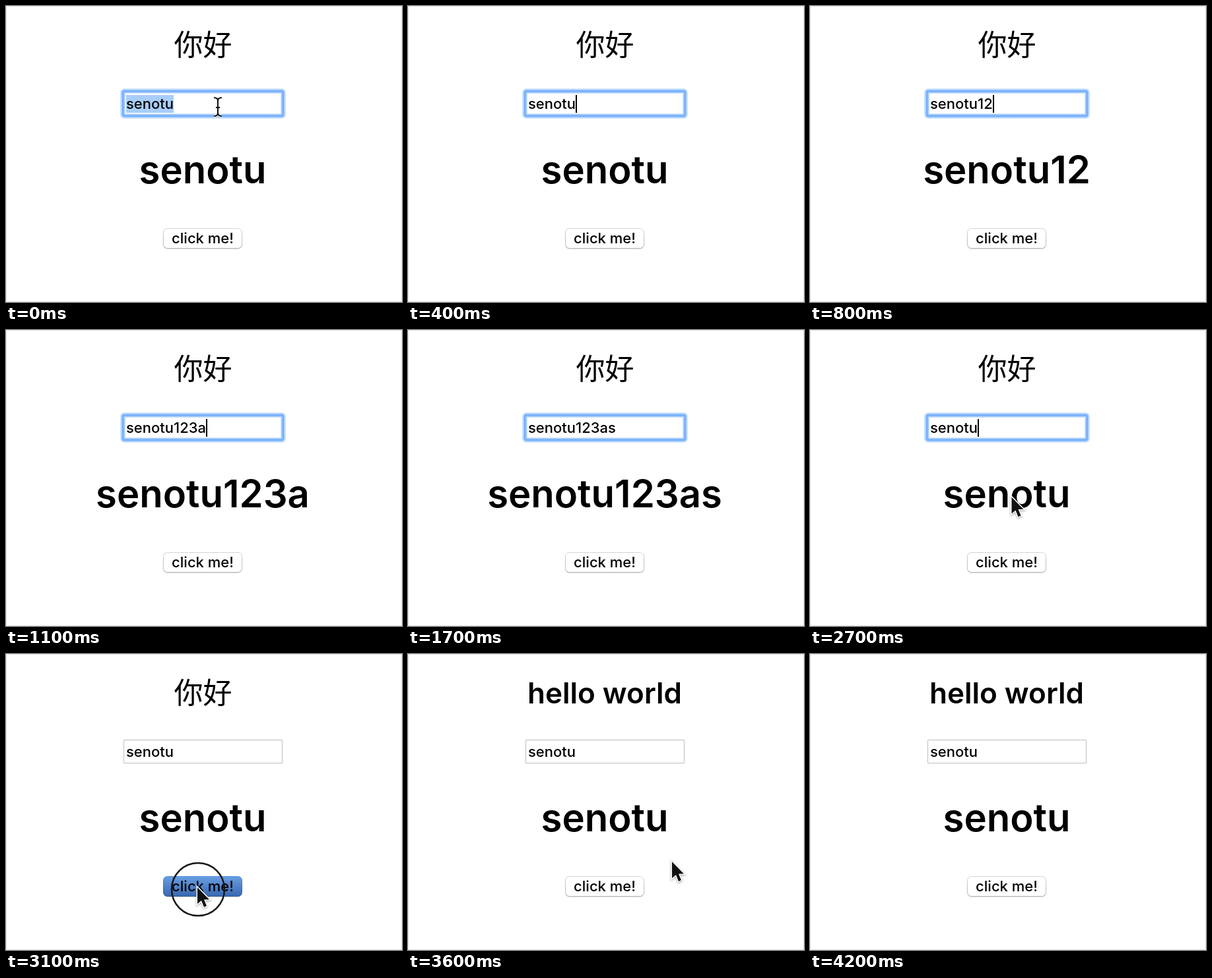
An HTML page with a canvas for the animation above (4.3 s loop, 600 px wide and 449 px high).

```html
<!DOCTYPE html>
<html lang="zh-CN">
<head>
<meta charset="utf-8">
<style>
  html, body { margin: 0; width: 600px; height: 449px; overflow: hidden; background: #fff; }
  canvas { display: block; }
</style>
</head>
<body>
<canvas id="stage" width="600" height="449"></canvas>
<script>
const ctx = document.getElementById('stage').getContext('2d');
const LOOP = 4300, STEP = 100, CENTER = 298;
const FONT = 'Inter, "Noto Sans CJK SC", "Noto Sans CJK", sans-serif';
const SMALL = '450 22px';
const NAME = 'senotu';

// [start time, text after the name]
const typing = [
  [0, ''], [500, '1'], [600, '12'], [900, '123'], [1100, '123a'], [1200, '123as'],
  [1400, '123asd'], [1600, '123as'], [1900, '123a'], [2000, '123'], [2100, '12'],
  [2200, '1'], [2300, '']
];
// [time, x, y] of the pointer tip
const moves = [
  [2500, 321, 153], [2900, 290, 354], [3300, 290, 354], [3600, 400, 315], [4000, 512, 270]
];

const within = (t, from, to) => t >= from && t < to;

function text(str, x, y, font, align = 'center') {
  ctx.font = `${font} ${FONT}`;
  ctx.textAlign = align;
  ctx.fillStyle = '#000';
  ctx.fillText(str, x, y);
}

function box(x, y, w, h, r, fill, stroke, line = 1) {
  ctx.beginPath();
  ctx.roundRect(x, y, w, h, r);
  ctx.lineWidth = line;
  if (fill) { ctx.fillStyle = fill; ctx.fill(); }
  if (stroke) { ctx.strokeStyle = stroke; ctx.stroke(); }
}

function gradient(y0, y1, top, bottom) {
  const g = ctx.createLinearGradient(0, y0, 0, y1);
  g.addColorStop(0, top);
  g.addColorStop(1, bottom);
  return g;
}

function drawInput(t, value) {
  if (t < 3100) {
    box(173, 125, 251, 46, 6, '#d3e6fd');
    box(174.5, 126.5, 248, 43, 5, '#a4ccfc');
    box(176, 128, 245, 40, 3, '#74affa');
    box(179.5, 131.5, 238, 33, 0, '#fff', '#a9cdfb', 2);
  } else {
    box(178.5, 130.5, 240, 35, 0, '#fff', '#bdbdbd');
  }
  ctx.font = `${SMALL} ${FONT}`;
  const width = ctx.measureText(value).width;
  if (t < 200) box(182, 135, width, 27, 0, '#a9cdf9');
  text(value, 182, 156, SMALL, 'left');
  if (within(t, 200, 1300) || within(t, 2300, 2800)) {
    box(Math.round(182 + width), 135, 2, 27, 0, '#000');
  }
}

function drawButton(pressed) {
  ctx.save();
  ctx.shadowColor = 'rgba(0,0,0,.25)';
  ctx.shadowOffsetY = 1;
  ctx.shadowBlur = 1;
  box(238.5, 337.5, 119, 30, 6,
    pressed ? gradient(337, 368, '#6a9fe2', '#3767b0') : '#fff');
  ctx.restore();
  box(238.5, 337.5, 119, 30, 6, null,
    pressed ? gradient(337, 368, '#4c8ae0', '#2f5a9c') : gradient(337, 368, '#d4d4d4', '#b8b8b8'));
  text('click me!', CENTER, 360, SMALL);
}

function drawBeam(x, y) {
  const path = new Path2D(
    'M-6-14Q0-14 0-9Q0-14 6-14M0-9V9M-6 14Q0 14 0 9Q0 14 6 14M-3 1H3');
  ctx.save();
  ctx.translate(x, y);
  for (const [color, width] of [['#fff', 4], ['#111', 2]]) {
    ctx.strokeStyle = color;
    ctx.lineWidth = width;
    ctx.stroke(path);
  }
  ctx.restore();
}

function drawArrow(x, y) {
  const path = new Path2D('M0 0V25L6 20L10 30L14 28L10 18.5H18Z');
  ctx.save();
  ctx.translate(x, y);
  ctx.strokeStyle = '#fff';
  ctx.lineWidth = 3;
  ctx.shadowColor = 'rgba(0,0,0,.4)';
  ctx.shadowBlur = 3;
  ctx.shadowOffsetY = 1;
  ctx.stroke(path);
  ctx.shadowColor = 'transparent';
  ctx.fillStyle = '#111';
  ctx.fill(path);
  ctx.restore();
}

function drawPointer(t) {
  if (t < 400) return drawBeam(321, 153);
  if (!within(t, 2500, 4100)) return;
  const i = Math.max(1, moves.findIndex(m => m[0] >= t));
  const [t0, x0, y0] = moves[i - 1], [t1, x1, y1] = moves[i];
  const p = (t - t0) / (t1 - t0), ease = p * p * (3 - 2 * p);
  const x = x0 + (x1 - x0) * ease, y = y0 + (y1 - y0) * ease;
  if (y < 166) drawBeam(x, y); else drawArrow(x, y);
}

function drawRing(t) {
  if (!within(t, 3000, 3300)) return;
  ctx.beginPath();
  ctx.arc(291, 357, t < 3100 ? 34 : 40, 0, Math.PI * 2);
  ctx.strokeStyle = '#161616';
  ctx.lineWidth = 2.5;
  ctx.stroke();
}

function draw(now) {
  const t = Math.floor(now % LOOP / STEP) * STEP;
  const value = NAME + typing.findLast(k => k[0] <= t)[1];
  box(0, 0, 600, 449, 0, '#fff');
  box(0.5, 0.5, 599, 448, 0, null, '#e6e6e6');
  if (t < 3300) text('你好', CENTER + 0.5, 75, '500 44px');
  else text('hello world', CENTER, 75, '600 44px');
  drawInput(t, value);
  text(value, CENTER, 269, '600 58px');
  drawButton(within(t, 3100, 3300));
  drawRing(t);
  drawPointer(t);
  requestAnimationFrame(draw);
}
requestAnimationFrame(draw);
</script>
</body>
</html>
```
